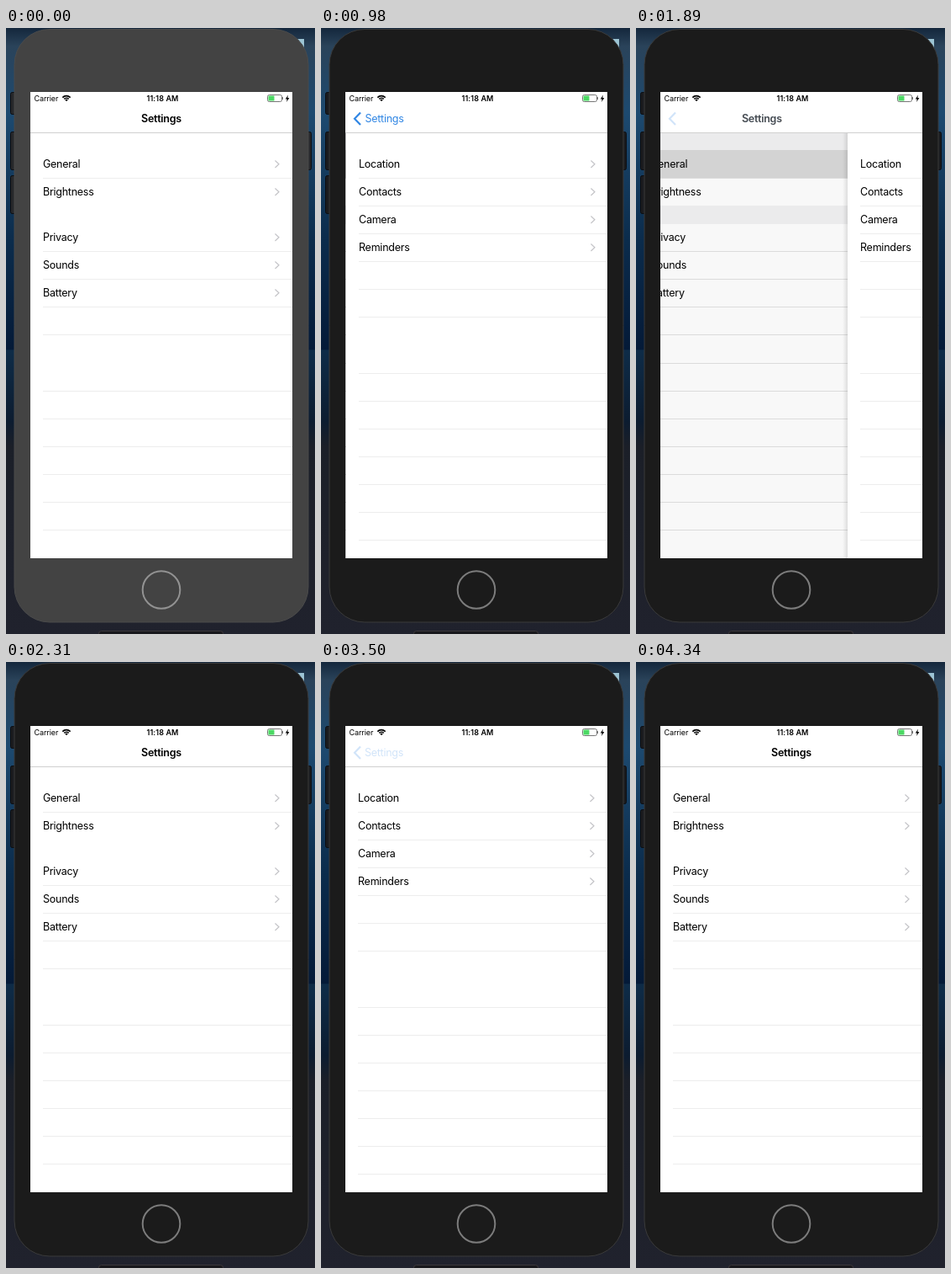
Animation of 368 by 720 pixels, one loop 4.48 s. Source, as an HTML page with a canvas:

```html
<!DOCTYPE html>
<html lang="en">
<head>
<meta charset="utf-8">
<title>Settings navigation</title>
<style>
  html, body { margin: 0; height: 100%; overflow: hidden; background: #0c1c30; }
  canvas { display: block; }
</style>
</head>
<body>
<canvas id="stage" width="368" height="720"></canvas>
<script>
const ctx = document.getElementById('stage').getContext('2d');
const LOOP = 4480, STEP = 70;
const LEFT = 29, TOP = 76, WIDTH = 312, HEIGHT = 554, RIGHT = LEFT + WIDTH;
const ROW = 33.12, FIRST_ROW = 144.6, SECOND_GROUP = 232;
const BLUE = '#2f86e4';

const clamp = v => Math.min(1, Math.max(0, v));
const ramp = (t, from, to) => clamp((t - from) / (to - from));
const spring = ms => {
  const x = 0.027 * Math.max(0, ms);
  return 1 - (1 + x) * Math.exp(-x);
};

// 0 = settings list, 1 = detail list
const depthAt = t =>
  clamp(spring(t - 696) - spring(t - 1797) + spring(t - 2723) - spring(t - 3635));
const highlightAt = t =>
  (t >= 490) - ramp(t, 1890, 2240) + (t >= 2520) - ramp(t, 3728, 4080);

function rect(x, y, w, h, fill) {
  ctx.fillStyle = fill;
  ctx.fillRect(x, y, w, h);
}

function panel(x, y, w, h, r, fill, stroke) {
  ctx.beginPath();
  ctx.roundRect(x, y, w, h, r);
  ctx.fillStyle = fill;
  ctx.fill();
  if (!stroke) return;
  ctx.strokeStyle = stroke;
  ctx.lineWidth = 1;
  ctx.stroke();
}

function line(points, color, width) {
  ctx.beginPath();
  points.forEach(p => ctx.lineTo(...p));
  ctx.strokeStyle = color;
  ctx.lineWidth = width;
  ctx.stroke();
}

function text(str, x, y, { size = 12.5, weight = 400, color = '#000', align = 'left', spacing = -0.25 } = {}) {
  ctx.font = `${weight} ${size}px Inter, Roboto, sans-serif`;
  ctx.letterSpacing = spacing + 'px';
  ctx.textAlign = align;
  ctx.fillStyle = color;
  ctx.fillText(str, x, y);
}

function withAlpha(alpha, draw) {
  ctx.save();
  ctx.globalAlpha = clamp(alpha);
  draw();
  ctx.restore();
}

function wallpaper() {
  const g = ctx.createLinearGradient(0, 0, 0, 720);
  [[0, '#14273c'], [0.03, '#2a435a'], [0.14, '#1d4a70'], [0.35, '#0b2c4c'], [0.53, '#041a38'],
   [0.532, '#0e2c48'], [0.65, '#0c1c30'], [0.69, '#1b1f28'], [1, '#20222d']]
    .forEach(stop => g.addColorStop(...stop));
  rect(0, 0, 368, 720, g);
  rect(345, 13, 10, 12, '#9cc4d4');
  panel(110.5, 716.5, 148, 10, 3, '#18181c', '#3d393c');
}

function phone(active) {
  const button = active ? '#1b1c1f' : '#27282b';
  [[5.5, 76.5, 26], [5.5, 123.5, 45], [5.5, 175.5, 45], [356.5, 123.5, 45]]
    .forEach(([x, y, h]) => panel(x, y, 7, h, 2, button, '#0a0b0e'));
  panel(10, 1.5, 350, 704.5, 42, active ? '#1b1b1b' : '#434343', active ? '#3a3a3a' : '#4b4b4b');
  ctx.beginPath();
  ctx.arc(185, 667.5, 22.3, 0, 7);
  ctx.strokeStyle = active ? '#7c7c7c' : '#929292';
  ctx.lineWidth = 2;
  ctx.stroke();
}

function rows(names, top, x) {
  names.forEach((name, i) => {
    const y = Math.round(top + i * ROW);
    text(name, x + 15, y + 21);
    line([[x + 291.5, y + 12.5], [x + 296, y + 16.7], [x + 291.5, y + 21]], '#c4c4c8', 1.2);
  });
}

function separators(top, count, x, color, skip) {
  for (let i = 1; i <= count; i++)
    if (i !== skip) rect(x + 15, Math.round(top + i * ROW), WIDTH, 1, color);
}

function rootList(x, highlight, moving) {
  const color = moving ? '#e1e1e1' : '#ededed';
  rect(x, TOP, WIDTH + 100, HEIGHT, '#fff');
  if (moving) {
    rect(x, 125, WIDTH, 20, '#f2f2f3');
    rect(x, 211, WIDTH, 22, '#f2f2f3');
  }
  withAlpha(highlight, () => rect(x, 145, WIDTH, 34, '#d9d9d9'));
  separators(FIRST_ROW, 1, x, color);
  separators(SECOND_GROUP, 11, x, color, moving ? 0 : 5);
  rows(['General', 'Brightness'], FIRST_ROW, x);
  rows(['Privacy', 'Sounds', 'Battery'], SECOND_GROUP, x);
}

function detailList(x) {
  const shadow = ctx.createLinearGradient(x - 6, 0, x, 0);
  shadow.addColorStop(0, 'rgba(0,0,0,0)');
  shadow.addColorStop(1, 'rgba(0,0,0,.11)');
  rect(x - 6, TOP, 6, HEIGHT, shadow);
  rect(x, TOP, WIDTH, HEIGHT, '#fff');
  separators(FIRST_ROW, 14, x, '#ededed', 7);
  rows(['Location', 'Contacts', 'Camera', 'Reminders'], FIRST_ROW, x);
}

function statusBar() {
  text('Carrier', 33.5, 87, { size: 9, spacing: -0.1 });
  text('11:18 AM', 186.5, 87, { size: 9, weight: 600, align: 'center', spacing: 0.1 });
  ctx.strokeStyle = '#000';
  [[6.4, 1.6], [3.8, 1.6], [1.2, 2.2]].forEach(([r, w]) => {
    ctx.beginPath();
    ctx.arc(72, 87, r, -Math.PI * 0.76, -Math.PI * 0.24);
    ctx.lineWidth = w;
    ctx.stroke();
  });
  panel(311.5, 79.5, 17, 8, 2, '#fff', '#777');
  rect(312.5, 80.5, 7, 6, '#4cd964');
  rect(329, 82, 1, 3, '#777');
  ctx.beginPath();
  [[336, 79.5], [332.8, 84.4], [334.8, 84.4], [334, 88], [337.4, 83], [335.3, 83]]
    .forEach(p => ctx.lineTo(...p));
  ctx.fillStyle = '#000';
  ctx.fill();
}

function navBar(t, depth) {
  const slide = depthAt(t - 6);
  const pressStart = t < 2310 ? 1610 : 3430;
  const pressed = t >= pressStart && t < pressStart + 700;
  const cap = pressed ? 1 - 0.78 * ramp(t, pressStart, pressStart + 60) : 1;
  const center = 185 - 110 * slide;
  rect(LEFT, TOP, WIDTH, 48, '#fff');
  rect(LEFT, 124, WIDTH, 1, '#d0d0d0');
  withAlpha(Math.min(depth, cap), () =>
    line([[47, 100.5], [40, 107.8], [47, 115]], BLUE, 2.2));
  withAlpha(Math.min(slide, cap), () =>
    text('Settings', center, 112, { color: BLUE, align: 'center' }));
  withAlpha(1 - slide, () =>
    text('Settings', center, 112, { weight: 600, align: 'center' }));
}

function draw(t) {
  const depth = depthAt(t);
  const moving = depth > 0.02 && depth < 0.998;
  const detailX = Math.round(RIGHT - WIDTH * depth);
  wallpaper();
  phone(t >= 490);

  ctx.save();
  ctx.beginPath();
  ctx.rect(LEFT, TOP, WIDTH, HEIGHT);
  ctx.clip();
  rootList(Math.round(LEFT - 0.3 * WIDTH * depth), highlightAt(t), moving);
  if (depth > 0.002) {
    rect(LEFT, TOP, WIDTH, HEIGHT, `rgba(0,0,0,${0.1 * depth})`);
    detailList(detailX);
  }
  navBar(t, depth);
  statusBar();
  ctx.restore();
}

function tick() {
  const t = performance.now() % LOOP;
  draw(Math.floor(t / STEP) * STEP);
  requestAnimationFrame(tick);
}
tick();
</script>
</body>
</html>
```
